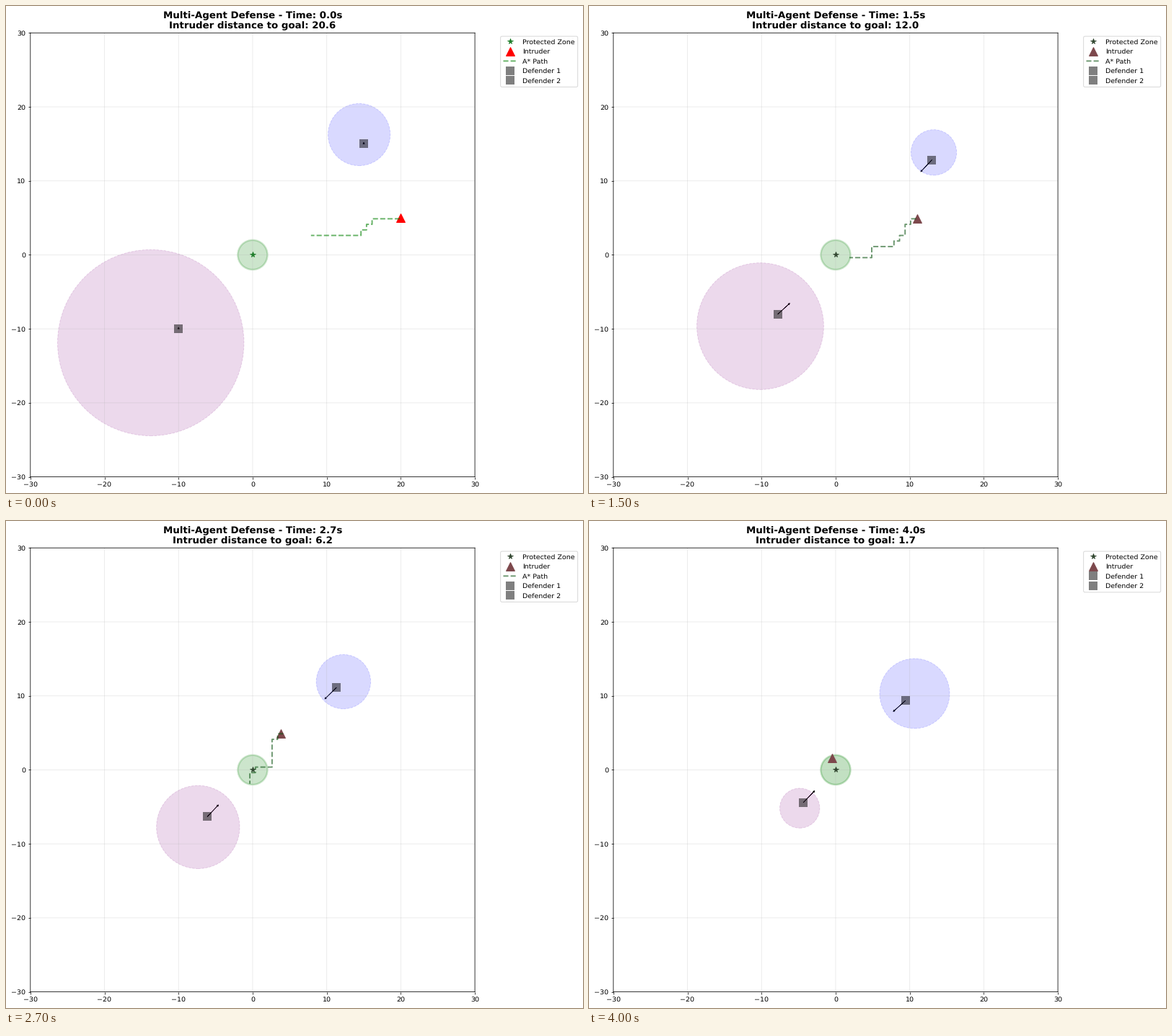
Animation, 800 px wide and 676 px high, one loop 4100 ms. Source, as a matplotlib script:

```python
import numpy as np
import matplotlib.pyplot as plt
from matplotlib.animation import FuncAnimation
from matplotlib.patches import Circle

W, H, DPI = 800, 676, 68.7
FRAMES, STEP = 41, 0.1
CELL = 0.75               # planning grid spacing
LOOKAHEAD = 19 * CELL     # visible length of the planned path
SPEED, RATIO = 2.0, 1 / 3  # defender speed, defender / intruder speed

# star, intruder and path colours: at rest, then while moving
BRIGHT = ("#1c7c28", "#ff0000", "#008000")
MUTED = ("#30462f", "#7d484c", "#0a5210")

# smooth, unhinted rendering
plt.rcParams["path.snap"] = False
plt.rcParams["text.hinting"] = "no_hinting"

fig = plt.figure(figsize=((W + 1e-6) / DPI, (H + 1e-6) / DPI), dpi=DPI)
ax = fig.add_axes([33.8 / W, 1 - 653.6 / H, 616.3 / W, 616.3 / H])


def track(start, times, headings):
    """Positions and velocities of a defender whose heading turns slowly."""
    angle = np.radians(np.interp(np.arange(1, FRAMES) * STEP, times, headings))
    vel = SPEED * np.column_stack([np.cos(angle), np.sin(angle)])
    vel[0] *= 0.7  # still accelerating
    vel = np.vstack([[0, 0], vel])
    return np.array(start) + np.cumsum(vel, axis=0) * STEP, vel


defenders = [
    ("Defender 1", "blue",
     *track((15, 15), [0, 1.5, 4], [227.6, 226.8, 221.9])),
    ("Defender 2", "purple",
     *track((-10, -10), [0, 1.5, 2.2, 3.5, 4], [41.8, 42.4, 45.5, 48.5, 46])),
]


def intruder_at(t):
    times = [0, 0.1, 3.3, 3.4, 3.5, 4]
    x = np.interp(t, times, [20, 19.4, 0.2, -0.3, -0.32, -0.53])
    y = np.interp(t, times, [5, 4.9, 4.87, 4.6, 4, 1.65])
    return np.array([x, y])


def snap(v):
    return (np.floor(v / CELL) + 0.5) * CELL


def planned_path(t, pos):
    """Staircase route: go left to each x, then down to each y."""
    x, y = snap(pos[0]), snap(pos[1])
    if t < 1.05:
        drops = [(x - 3.75, 4.125), (x - 4.5, 3.375), (x - 5.25, 2.625),
                 (7.125, 1.875), (6.375, -0.375)]
    elif t < 2.25:
        drops = [(x - 0.75, 4.125), (x - 1.5, 2.625), (x - 2.25, 1.875),
                 (x - 3, 1.125), (x - 6, -0.375)]
    else:
        drops = [(x - 0.75, 4.125), (x - 1.5, 0.375), (0.375, -0.375)]
    drops.append((-0.375, -1.875))

    points, left = [(x, y)], LOOKAHEAD
    for tx, ty in drops:
        dx = min(max(x - max(tx, -0.375), 0), left)
        x, left = x - dx, left - dx
        points.append((x, y))
        dy = min(max(y - ty, 0), left)
        y, left = y - dy, left - dy
        points.append((x, y))
    return np.array(points)


def reach_circle(defender, intruder, color):
    """Apollonius circle: points the defender reaches first."""
    k = RATIO ** 2
    center = (defender - k * intruder) / (1 - k)
    radius = RATIO * np.hypot(*(defender - intruder)) / (1 - k)
    ax.add_patch(Circle(center, radius, color=color, alpha=0.15,
                        linestyle="--"))


def draw(i):
    t = i * STEP
    captured = i == FRAMES - 1
    star, red, green = MUTED if i else BRIGHT
    pos = intruder_at(t)
    ax.clear()
    ax.set_xlim(-30, 30)
    ax.set_ylim(-30, 30)
    ax.grid(True, alpha=0.3)

    ax.add_patch(Circle((0, 0), 2, color="green", lw=2.6,
                        alpha=0.24 if captured else 0.2))
    ax.plot(0, 0, "*", color=star, ms=8, label="Protected Zone")
    ax.plot(*pos, "^", color=red, ms=12, label="Intruder")
    if not captured:
        ax.plot(*planned_path(t, pos).T, "--", color=green, lw=2, alpha=0.6,
                label="A* Path")

    for name, color, places, vel in defenders:
        ax.plot(*places[i], "ks", ms=13, mew=0, alpha=0.5, label=name)
        ax.arrow(*places[i], *vel[i], head_width=0.22, head_length=0.22,
                 fc="black", ec="black", lw=0.7)
        reach_circle(places[i], pos, color)

    ax.set_title(f"Multi-Agent Defense - Time: {t:.1f}s\n"
                 f"Intruder distance to goal: {np.hypot(*pos):.1f}",
                 fontsize=14, fontweight="bold")
    ax.legend(bbox_to_anchor=(1.05, 1), loc="upper left")
    return []


anim = FuncAnimation(fig, draw, frames=FRAMES, init_func=lambda: draw(0),
                     interval=100, repeat=True, repeat_delay=0)
plt.show()
```
